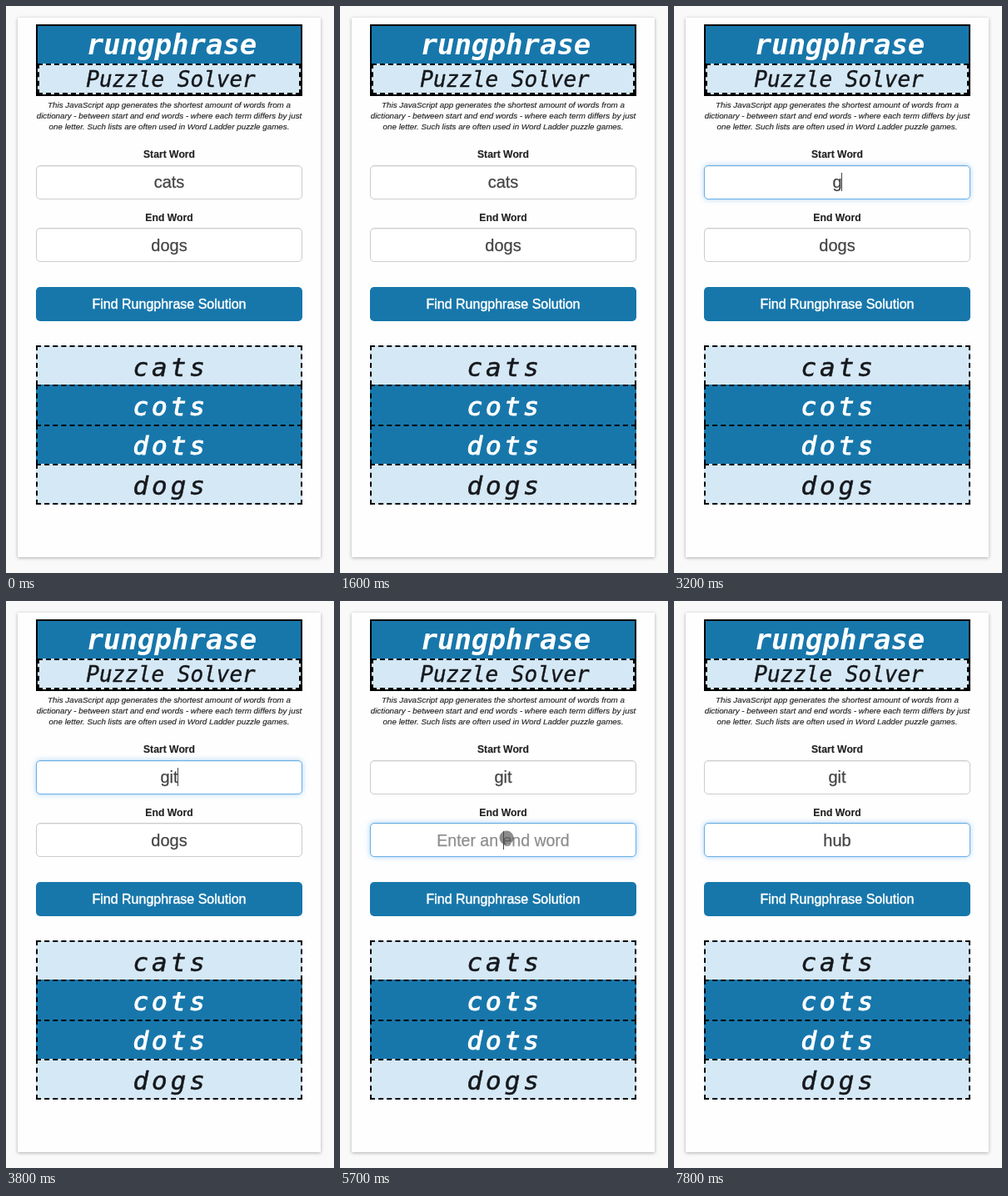
An HTML page that plays this animation: 394 by 680 pixels, repeating every 8 s.

```html
<!DOCTYPE html>
<html lang="en">
<head>
<meta charset="utf-8">
<title>Puzzle Solver</title>
<style>
  html, body { margin: 0; width: 100%; height: 100%; overflow: hidden; background: #f9f9f9; }
  div, svg { position: absolute; box-sizing: border-box; }
  svg { left: 0; top: 0; }
  .card { left: 14px; top: 14px; width: 364px; height: 647px; background: #fefefe; box-shadow: 0 1px 4px rgba(0,0,0,.3); }
  .title, .field, .button, .row { left: 36px; width: 320px; }
  .title { top: 22px; height: 86px; border: 2px solid #000; background: #1777ab; }
  .subtitle { left: 38px; top: 69px; width: 316px; height: 37px; border: 2px dashed #000; background: #d5e8f5; }
  .field { height: 41px; border: 1px solid #ccc; border-radius: 5px; background: #fff; }
  .button { top: 337px; height: 41px; border-radius: 5px; background: #1777ab; }
  .row { height: 48px; border: 2px dashed #000; border-bottom: 0; background: #d5e8f5; }
  .row.last { height: 49px; border-bottom: 2px dashed #000; }
  .row.blue { background: #1777ab; }
  text { font-family: "Liberation Sans", Arial, sans-serif; text-anchor: middle; fill: #222; stroke: #222; stroke-width: .15px; }
  .mono { font-family: "DejaVu Sans Mono", monospace; font-style: italic; fill: #15181c; stroke: #15181c; }
  .head { font-size: 34px; font-weight: bold; fill: #fff; stroke: none; }
  .sub { font-size: 26px; stroke-width: .4px; }
  .note { font-size: 9.8px; font-style: italic; }
  .label { font-size: 12.2px; font-weight: bold; }
  .press { font-size: 16px; fill: #fff; stroke: #fff; stroke-width: .45px; }
  .word { font-size: 31px; letter-spacing: 3.9px; text-anchor: start; stroke-width: .5px; }
  .light { fill: #fff; stroke: #fff; stroke-width: 1.1px; }
  .value { font-size: 20px; fill: #444; stroke: #444; stroke-width: .25px; }
  .hint { font-size: 19.5px; fill: #8e8e8e; stroke: #8e8e8e; }
</style>
</head>
<body>
<div class="card"></div>
<div class="title"></div>
<div class="subtitle"></div>
<div class="field" style="top:191px"></div>
<div class="field" style="top:266px"></div>
<div class="button"></div>
<svg width="394" height="680">
  <text class="mono head" x="199" y="58">rungphrase</text>
  <text class="mono sub" x="198" y="97">Puzzle Solver</text>
  <text class="note" x="196" y="121.7">This JavaScript app generates the shortest amount of words from a</text>
  <text class="note" x="196" y="134.9">dictionary - between start and end words - where each term differs by just</text>
  <text class="note" x="196" y="148.1">one letter. Such lists are often used in Word Ladder puzzle games.</text>
  <text class="label" x="196" y="182">Start Word</text>
  <text class="label" x="196" y="257.5">End Word</text>
  <text class="value" x="196" y="218"></text>
  <text class="value" x="196" y="293.5"></text>
  <text class="press" x="196" y="363">Find Rungphrase Solution</text>
  <rect id="caret" width="1" height="22" fill="#444"/>
  <circle id="pointer" r="8.5" fill="#464646" fill-opacity=".62"/>
</svg>
<script>
const LOOP = 8000, STEP = 100, BLINK = 500, FADE = 150;
const svg = document.querySelector('svg');
const caret = document.getElementById('caret');
const pointer = document.getElementById('pointer');
const boxes = document.querySelectorAll('.field');
const labels = document.querySelectorAll('.value');

const fields = [
  { before: 'cats', hint: 'Enter a start word', typed: 'git', keys: [3200, 3400, 3600], focus: 2200, blur: 5200, caretY: 200 },
  { before: 'dogs', hint: 'Enter an end word', typed: 'hub', keys: [5900, 6100, 6300], focus: 5250, blur: Infinity, caretY: 276 }
];

// The pointer shows from each move until the next key press.
const moves = [
  { start: 1700, end: 2100, hide: 3200, from: [370, 240], to: [185, 215] },
  { start: 4500, end: 4800, hide: 5900, from: [185, 215], to: [200, 284] }
];

const clamp = v => Math.max(0, Math.min(1, v));
const show = (el, on) => el.setAttribute('visibility', on ? 'visible' : 'hidden');

['cats', 'cots', 'dots', 'dogs'].forEach((word, i) => {
  const blue = i === 1 || i === 2;
  const row = document.createElement('div');
  row.className = 'row' + (blue ? ' blue' : '') + (i === 3 ? ' last' : '');
  row.style.top = Math.floor(407 + 47.5 * i) + 'px';
  document.body.insertBefore(row, svg);
  svg.insertAdjacentHTML('afterbegin',
    `<text class="mono word ${blue ? 'light' : ''}" x="152.5" y="${443.5 + 47.4 * i}">${word}</text>`);
});

function drawField(field, box, label, t) {
  const count = field.keys.filter(k => t >= k).length;
  const touched = t >= field.focus;
  const empty = touched && count === 0;
  label.textContent = !touched ? field.before : empty ? field.hint : field.typed.slice(0, count);
  label.setAttribute('class', empty ? 'value hint' : 'value');

  const glow = clamp((t - field.focus) / FADE) * (1 - clamp((t - field.blur) / FADE));
  const mix = (a, b) => a + (b - a) * glow;
  box.style.borderColor = `rgb(${mix(204, 102)},${mix(204, 175)},${mix(204, 233)})`;
  box.style.boxShadow = `inset 0 1px 1px rgba(0,0,0,.075), 0 0 6px rgba(102,175,233,${0.55 * glow})`;

  if (touched && t < field.blur) {
    const since = t - (count ? field.keys[count - 1] : field.focus);
    const width = empty ? 0 : label.getComputedTextLength();
    caret.setAttribute('x', Math.floor(196 + width / 2));
    caret.setAttribute('y', field.caretY);
    show(caret, Math.floor(since / BLINK) % 2 === 0);
  }
}

function drawPointer(t) {
  const move = moves.find(m => t >= m.start && t < m.hide);
  show(pointer, move);
  if (!move) return;
  const p = clamp((t - move.start) / (move.end - move.start));
  const ease = 1 - (1 - p) ** 2;
  ['cx', 'cy'].forEach((name, i) =>
    pointer.setAttribute(name, move.from[i] + (move.to[i] - move.from[i]) * ease));
}

function frame() {
  const t = Math.floor(performance.now() % LOOP / STEP) * STEP;
  show(caret, false);
  fields.forEach((field, i) => drawField(field, boxes[i], labels[i], t));
  drawPointer(t);
  requestAnimationFrame(frame);
}
frame();
</script>
</body>
</html>
```
